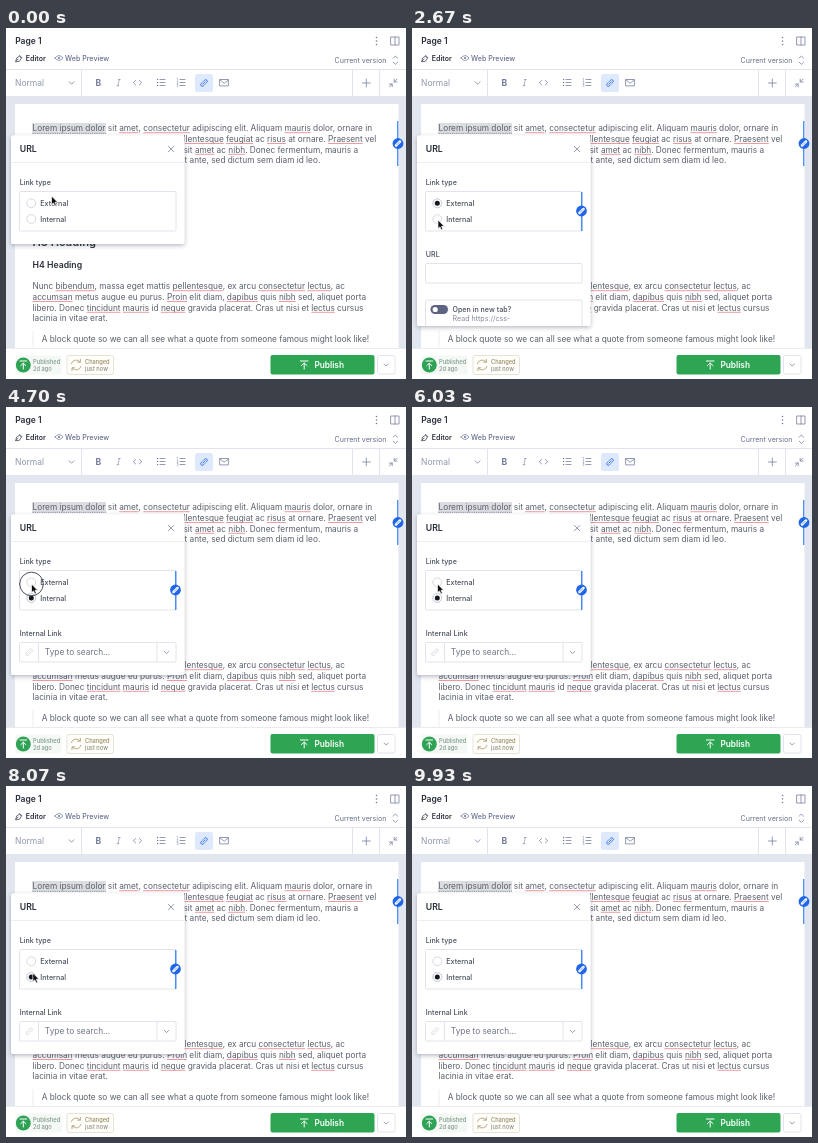
An HTML page that plays this animation: 400 by 351 pixels, repeating every 9.96 s.

```html
<!DOCTYPE html>
<html lang="en">
<head>
<meta charset="utf-8">
<title>Link editor</title>
<style>
  html, body { margin: 0; height: 100%; overflow: hidden; background: #fff; }
  svg { display: block; width: 100vw; height: 100vh; }
  text { font-family: Inter, "Liberation Sans", sans-serif; white-space: pre; }
  .icon { fill: none; stroke: #7a81a0; stroke-width: .8; stroke-linecap: round; stroke-linejoin: round; }
</style>
</head>
<body>
<svg id="stage" viewBox="0 0 400 351"></svg>
<script>
const LOOP = 9960;
const INK = '#2a2e3a', BODY = '#5b606c', SLATE = '#757c9b', LABEL = '#474c5b';
const LINE = '#e1e4ec', BLUE = '#2166e8', SKY = '#4a8cf2';

const text = (x, y, str, size, fill = BODY, weight = 400, extra = '') =>
  `<text x="${x}" y="${y}" font-size="${size}" fill="${fill}" font-weight="${weight}" ${extra}>${str}</text>`;
const rect = (x, y, w, h, fill, stroke = 'none', r = 0) =>
  `<rect x="${x}" y="${y}" width="${w}" height="${h}" rx="${r}" fill="${fill}" stroke="${stroke}"/>`;
const icon = (d, extra = '') => `<path class="icon" d="${d}" ${extra}/>`;
const line = (d, stroke = LINE, w = 1) => `<path d="${d}" stroke="${stroke}" stroke-width="${w}" fill="none"/>`;
const dot = (x, y, r, fill, stroke = 'none') =>
  `<circle cx="${x}" cy="${y}" r="${r}" fill="${fill}" stroke="${stroke}"/>`;
const chevron = (x, y, s = 2.5) => icon(`M${x - s} ${y - s / 2}l${s} ${s}l${s} ${-s}`);
const chain = (x, y, color, k = 1) =>
  `<g transform="translate(${x} ${y}) rotate(-45) scale(${k})" fill="none" stroke="${color}" stroke-linecap="round">
    <path d="M-1 -2H-3a2 2 0 0 0 0 4H-1M1 -2H3a2 2 0 0 1 0 4H1M-2 0H2"/></g>`;
const badge = (x, y) => dot(x, y, 5.4, BLUE) +
  `<path d="M${x - 2} ${y + 2}l4 -4" stroke="#fff" stroke-width="2.5" stroke-linecap="round"/>` +
  line(`M${x - 1.6} ${y + 1.6}l3.2 -3.2`, BLUE, .6);

// Running text; words wrapped in asterisks get a spelling underline.
const prose = (x, y, str) =>
  text(x, y, str.replace(/\*/g, ''), 8.27, BODY, 400, `data-marked="${str}"`);

function header() {
  return rect(0, 0, 400, 68, '#fff') +
    text(9.2, 16, 'Page 1', 8.5, INK, 600) +
    [9.5, 13, 16.5].map(y => dot(370.5, y, .8, SLATE)).join('') +
    icon('M385 9h8v8h-8zM389 9v8') +
    icon('M9.8 33.4l.8-3.4 2.8-1.8 2 2-1.8 2.8zM13.6 27.4l2.4 2.4M9.8 33.4l2.4-2.4', `style="stroke:${LABEL}"`) +
    text(19.8, 32.8, 'Editor', 7, INK, 600) +
    icon('M49 30q4-5 8 0q-4 5-8 0z') + dot(53, 30, 1.1, SLATE) +
    text(59, 32.8, 'Web Preview', 7.1, '#666d8d', 500) +
    text(328.5, 35, 'Current version', 7.1, '#666d8d') +
    icon('M387.2 30.2l2.2-2.2 2.2 2.2M387.2 34.2l2.2 2.2 2.2-2.2') +
    line('M0 41.5H400M0 68.5H400M75.5 42V68M346.5 42V68M373.5 42V68');
}

function toolbar() {
  const rows = [51.5, 54.5, 57.5];
  const bars = x => rows.map(y => `M${x} ${y}h5`).join('');
  return text(9, 57.8, 'Normal', 8.5, '#9197ad') + chevron(65.5, 55) +
    text(89.4, 58, 'B', 8.6, SLATE, 700) +
    icon('M112.4 51.5h1.8M111 57.7h1.8M113.3 51.5l-1.4 6.2', 'opacity=".75"') +
    icon('M129.6 52.5l-2.3 2.2 2.3 2.2M133.4 52.5l2.3 2.2-2.3 2.2') +
    icon(bars(154)) + rows.map(y => dot(151.6, y, .7, SLATE)).join('') +
    icon(bars(174)) + rows.map((y, i) => text(170.5, y + 1.2, i + 1, 3.2, SLATE, 500)).join('') +
    rect(189, 46, 18, 18, '#dfe9fd', 'none', 2) + chain(198, 55, BLUE, .8) +
    icon('M214 51.5h8.4v6.4h-8.4zM214 52l4.2 3.2 4.2-3.2') +
    icon('M360.3 51v8M356.3 55h8') +
    icon('M388.2 51.2v2.8h2.8M391 51.2l-2.8 2.8M386.2 58.8v-2.8h-2.8M383.4 58.8l2.8-2.8');
}

function page() {
  return rect(0, 69, 400, 252, '#e2e6ee') + rect(9, 76, 383.5, 245, '#fff') +
    rect(26, 95, 74, 10.5, '#dcdde1') +
    `<path d="M26.5 105.4H100" stroke="#7d8392" stroke-width=".8" stroke-dasharray="1.4 .8"/>` +
    prose(26.5, 103, 'Lorem ipsum dolor sit *amet*, *consectetur* adipiscing elit. Aliquam *mauris* dolor, ornare in') +
    prose(177.5, 113.8, '*llentesque* *feugiat* ac *risus* at ornare. *Praesent* vel') +
    prose(177.5, 124.6, 'sit *amet* ac *nibh*. Donec fermentum, mauris a') +
    prose(176.5, 135.4, 'it ante, sed dictum sem diam id leo.') +
    line('M391.7 93V138', SKY, 1.3) + badge(392, 115.5) +
    text(26.5, 218, 'H3 Heading', 11.2, INK, 600) +
    text(26.5, 240.4, 'H4 Heading', 8.7, INK, 600) +
    prose(26.5, 261, 'Nunc *bibendum*, massa eget mattis *pellentesque*, ex arcu *consectetur* *lectus*, ac') +
    prose(26.5, 271.8, '*accumsan* metus augue eu purus. *Proin* elit diam, *dapibus* quis *nibh* sed, aliquet porta') +
    prose(26.5, 282.6, 'libero. Donec *tincidunt* *mauris* id *neque* gravida placerat. Cras ut nisi et *lectus* cursus') +
    prose(26.5, 293.4, 'lacinia in vitae erat.') +
    line('M27 303V320', '#eceef3') +
    prose(35.7, 313.6, 'A block quote so we can all see what a quote from someone famous might look like!');
}

function footer() {
  return rect(0, 320, 400, 31, '#fff') + line('M0 320.5H400', '#e9ebf1') +
    rect(9.5, 327.5, 46, 19, '#f5f9f6', 'none', 2) + dot(17.3, 337, 7.5, '#2fa355') +
    icon('M14 333h6.6M17.3 341v-5.6M14.8 337.6l2.5-2.4 2.5 2.4', 'style="stroke:#fff;stroke-width:1"') +
    text(27, 336, 'Published', 5.8, '#7d9a88', 500) +
    text(27, 343.2, '2d ago', 5.7, '#84988b', 500) +
    rect(61, 327.5, 46.5, 19, '#fffefa', '#e6e2d6', 2) +
    icon('M65.4 335.6a5 5 0 0 1 8.6-1.8M75 338.4a5 5 0 0 1-8.6 1.8M74.4 331.4v2.8h-2.8M66 342.6v-2.8h2.8', 'style="stroke:#a8986c"') +
    text(79, 336, 'Changed', 5.7, '#978a62', 500) +
    text(79, 343.2, 'just now', 5.7, '#8f8b7c', 500) +
    rect(264.5, 327, 104, 19.5, '#2da552', 'none', 2) +
    icon('M294.4 333h7.6M298.2 341v-5.8M295.4 337.6l2.8-2.6 2.8 2.6', 'style="stroke:#fff;stroke-width:1"') +
    text(308.4, 339.8, 'Publish', 8.3, '#fff', 600) +
    rect(371.5, 327.5, 17.5, 18.5, '#fff', LINE, 2) + chevron(380.2, 337, 2.1);
}

const radio = (id, y, label) =>
  dot(25.3, y, 4.4, '#fff', '#d6d9e1') + `<g id="${id}">${dot(25.3, y, 4.4, '#fff', '#cbcfd8')}${dot(25.3, y, 2.5, '#16181f')}</g>` +
  text(34.3, y + 2.7, label, 7.15, LABEL, 500);

function dialog() {
  return `<clipPath id="clip"><rect class="panel" x="5" y="107.5" width="173.5" rx="2"/></clipPath>
    <rect class="panel" x="5" y="107.5" width="173.5" rx="2" fill="#fff" filter="url(#shadow)"/>
    <g clip-path="url(#clip)">` +
    text(13.8, 124.2, 'URL', 8.7, INK, 600) + icon('M162.4 118.4l5.4 5.4M167.8 118.4l-5.4 5.4') +
    line('M5 134.5H178.5', '#eceef3') +
    text(13.8, 157.2, 'Link type', 7.1, LABEL, 500) +
    rect(13.5, 163.5, 156.5, 39.5, '#fff', LINE, 1) +
    radio('extDot', 175.3, 'External') + radio('intDot', 191, 'Internal') +
    `<g id="extForm">` +
    text(13.8, 229.2, 'URL', 7.1, LABEL, 500) +
    rect(13.5, 235.5, 156.5, 19.5, '#fff', LINE, 1) +
    rect(13.5, 272, 156.5, 40, '#fff', LINE, 1) +
    rect(18.5, 277, 17.5, 9, '#5d6482', 'none', 4.5) + dot(23.2, 281.5, 2.6, '#fff') +
    text(40.5, 283.8, 'Open in new tab?', 7.1, LABEL, 500) +
    text(40.5, 293.4, 'Read https://css-', 7.1, '#858a9a') +
    `</g><g id="intForm">` +
    text(13.8, 229.2, 'Internal Link', 7.15, LABEL, 500) +
    rect(13.5, 235.5, 156.5, 19.5, '#fff', LINE, 1) + line('M32.5 236V255M151 236V255') +
    chain(23, 245.3, '#d4d7e0', .8) +
    text(38.8, 248.2, 'Type to search...', 8.3, '#6f7584') + chevron(160.5, 245.5, 2.2) +
    `</g><g id="mark">${line('M169.7 164V203', SKY, 1.5)}${badge(169.5, 183)}</g></g>`;
}

const stage = document.getElementById('stage');
stage.innerHTML =
  `<filter id="shadow" x="-10%" y="-10%" width="120%" height="125%">
    <feDropShadow dx="0" dy="1.5" stdDeviation="2.2" flood-color="#39415c" flood-opacity=".38"/></filter>` +
  page() + header() + toolbar() + footer() + dialog() +
  `<circle id="ring" fill="none" stroke="#3a3d45" stroke-width=".9"/>
  <path id="cursor" d="M0 0V8.6L2 6.9L3.4 10L4.9 9.3L3.5 6.3H6.2Z" fill="#0b0c0f" stroke="#fff" stroke-width=".7"/>`;

for (const el of [...stage.querySelectorAll('[data-marked]')]) {
  const parts = el.dataset.marked.split('*');
  let at = 0, d = '';
  parts.forEach((part, i) => {
    if (i % 2) {
      const a = el.getStartPositionOfChar(at), b = el.getEndPositionOfChar(at + part.length - 1);
      d += `M${a.x} ${a.y + 1.7}H${b.x}`;
    }
    at += part.length;
  });
  if (d) el.insertAdjacentHTML('afterend', line(d, '#e0727a', .7));
}

const $ = id => document.getElementById(id);
const panels = stage.querySelectorAll('.panel');
const show = (id, on) => $(id).setAttribute('visibility', on ? 'visible' : 'hidden');

// Pointer stops: time, x, y.
const path = [
  [0, 45.5, 168], [330, 25.5, 177], [2000, 25.5, 177], [2400, 26, 192],
  [4000, 26, 192], [4400, 25.5, 177], [5000, 25.5, 177], [5250, 26, 189],
  [5680, 26, 189], [5950, 25.5, 177], [7300, 25.5, 177], [7600, 26.8, 187],
  [8450, 26.8, 187], [9050, 95, 362], [LOOP, 95, 362]
];
// Clicks alternate between External and Internal.
const clicks = [1120, 2740, 4620, 5380, 6180, 7740];
const DELAY = 150, RING = 290;

function pointer(t) {
  const i = path.findIndex(p => p[0] > t);
  const [t0, x0, y0] = path[i - 1], [t1, x1, y1] = path[i];
  const u = (t - t0) / (t1 - t0), e = u * u * (3 - 2 * u);
  return [x0 + (x1 - x0) * e, y0 + (y1 - y0) * e];
}

function draw(t) {
  const [x, y] = pointer(t);
  $('cursor').setAttribute('transform', `translate(${x} ${y})`);

  const done = clicks.filter(c => t >= c + DELAY).length;
  const ext = done % 2 === 1, int = done > 0 && !ext;
  const bottom = ext ? 298 : int ? 268 : 216;
  panels.forEach(p => p.setAttribute('height', bottom - 107.5));
  show('extDot', ext);
  show('extForm', ext);
  show('intDot', int);
  show('intForm', int);
  show('mark', done > 0);

  const click = clicks.find(c => t >= c && t < c + RING);
  show('ring', click !== undefined);
  if (click !== undefined) {
    const age = t - click, ring = $('ring');
    ring.setAttribute('cx', x);
    ring.setAttribute('cy', y);
    ring.setAttribute('r', 7 + 4.8 * Math.min(1, age / 75));
    ring.setAttribute('opacity', Math.min(1, (RING - age) / 120));
  }
}

const start = performance.now();
function tick() {
  draw((performance.now() - start) % LOOP);
  requestAnimationFrame(tick);
}
tick();
</script>
</body>
</html>
```
